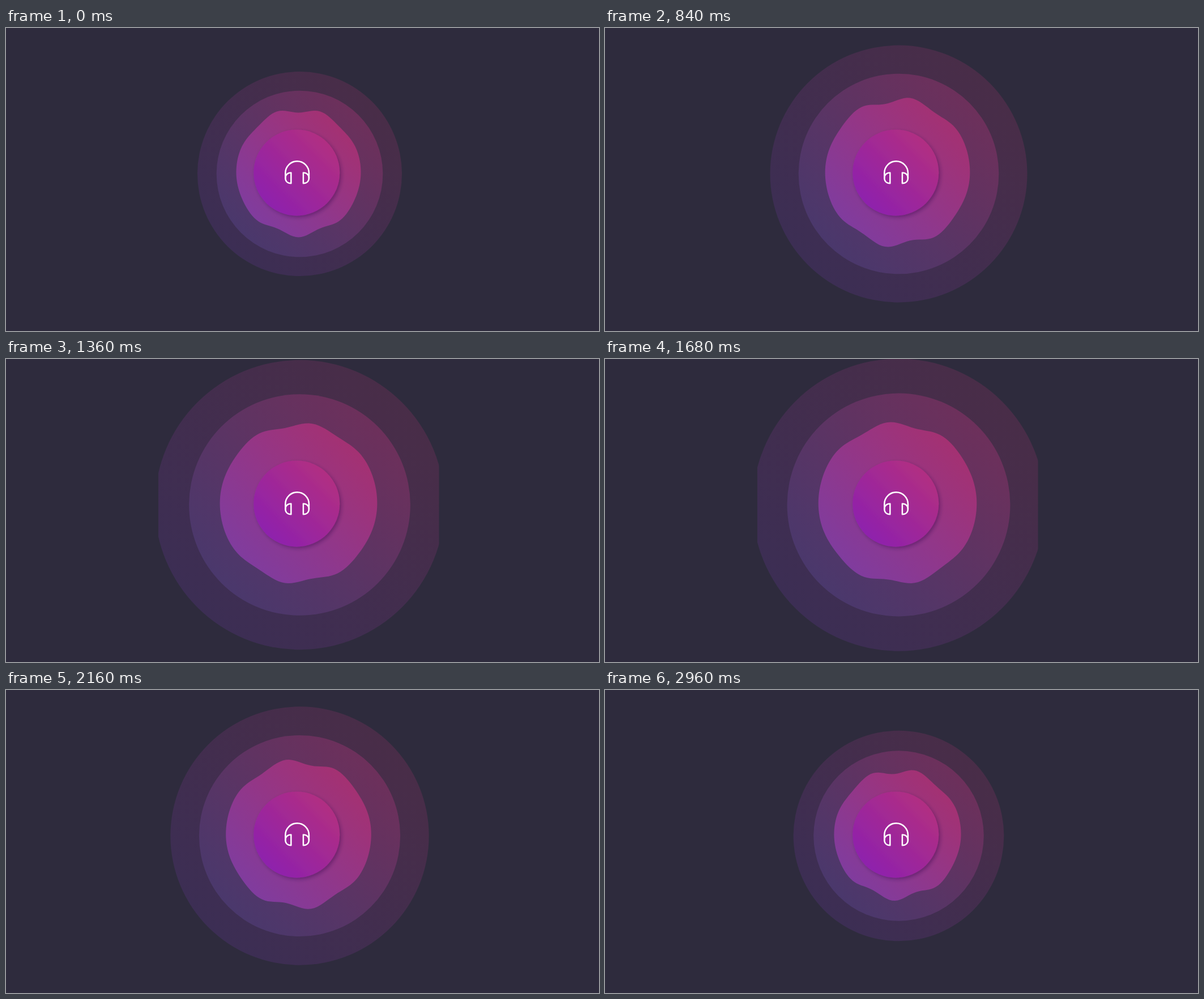
Write an HTML page that moves like this. It is 1047 px wide and 535 px high and loops after 3 s.

```html
<!DOCTYPE html>
<html lang="en">
<head>
<meta charset="utf-8">
<title>Pulsing headphones</title>
<style>
  html, body { margin: 0; width: 100%; height: 100%; overflow: hidden; background: #2e2b3d; }
  svg { display: block; width: 100%; height: 100%; }
</style>
</head>
<body>
<svg viewBox="0 0 1047 535">
  <defs>
    <linearGradient id="diagonal" x1=".146" y1=".854" x2=".854" y2=".146"/>
    <linearGradient id="gOuter" href="#diagonal">
      <stop stop-color="#3c2e54"/><stop offset="1" stop-color="#492d48"/>
    </linearGradient>
    <linearGradient id="gMid" href="#diagonal">
      <stop stop-color="#4a386c"/><stop offset="1" stop-color="#6d305b"/>
    </linearGradient>
    <linearGradient id="gBlob" href="#diagonal">
      <stop stop-color="#803c9e"/><stop offset="1" stop-color="#a43172"/>
    </linearGradient>
    <linearGradient id="gCore" href="#diagonal">
      <stop stop-color="#8e21ad"/><stop offset="1" stop-color="#b12f82"/>
    </linearGradient>
    <filter id="shadow" x="-20%" y="-20%" width="140%" height="140%">
      <feDropShadow dx="3" dy="3" stdDeviation="3" flood-color="#2e1040" flood-opacity=".35"/>
    </filter>
    <clipPath id="frame"><rect x="269" width="495.5" height="535"/></clipPath>
  </defs>
  <g clip-path="url(#frame)">
    <circle id="outer" cx="518.5" cy="257.5" fill="url(#gOuter)"/>
  </g>
  <circle id="mid" cx="518.5" cy="257.5" fill="url(#gMid)"/>
  <path id="blob" fill="url(#gBlob)"/>
  <circle cx="513.2" cy="255.4" r="76" fill="url(#gCore)" filter="url(#shadow)"/>
  <g fill="none" stroke="#fff" stroke-width="2.5" stroke-linejoin="round" stroke-linecap="round">
    <path d="M493.3 265V256a20.8 20.8 0 0 1 41.6 0V265"/>
    <path d="M503.3 255.5V274.2C497 274.2 493.3 270.5 493.3 265S497 255.5 503.3 255.5Z"/>
    <path d="M524.9 255.5V274.2C531.2 274.2 534.9 270.5 534.9 265S531.2 255.5 524.9 255.5Z"/>
  </g>
</svg>
<script>
const LOOP = 3000, PEAK = 1555, TAU = Math.PI * 2;
const STEPS = 144, WAVES = 8.5;
const CX = 516.5, CY = 254.8;
const $ = id => document.getElementById(id);
const outer = $('outer'), mid = $('mid'), blob = $('blob');

// Steady growth to 1, then a fall that slows slightly
function pulse(t) {
  if (t < PEAK) return t / PEAK;
  const q = (t - PEAK) / (LOOP - PEAK);
  return 1 - q * (1.14 - 0.18 * q);
}

// The ripple travels six times per loop, with a slight sway
const phase = t => TAU * (t / 500 + 0.08 * Math.sin(TAU * t / LOOP));
const ripple = t => 5.5 * Math.abs(Math.sin(Math.PI * (t - 480) / 700));

// Circle shifted vertically by a wave along x that fades at the sides
function wavyCircle(r, amp, shift) {
  const pts = [];
  for (let i = 0; i < STEPS; i++) {
    const a = i / STEPS * TAU, u = Math.cos(a), v = Math.sin(a);
    const y = CY + r * v + amp * Math.abs(v) * Math.cos(WAVES * u - shift);
    pts.push((CX + r * u).toFixed(2) + ' ' + y.toFixed(2));
  }
  return 'M' + pts.join('L') + 'Z';
}

function draw(now) {
  const t = now % LOOP, p = pulse(t);
  outer.setAttribute('r', 180.5 + 86 * p);
  mid.setAttribute('r', 146.8 + 55.5 * p);
  blob.setAttribute('d', wavyCircle(110 + 33 * p, ripple(t), phase(t)));
}

let start;
function tick(now) {
  start ??= now;
  draw(Math.max(0, now - start));
  requestAnimationFrame(tick);
}
draw(0);
requestAnimationFrame(tick);
</script>
</body>
</html>
```
